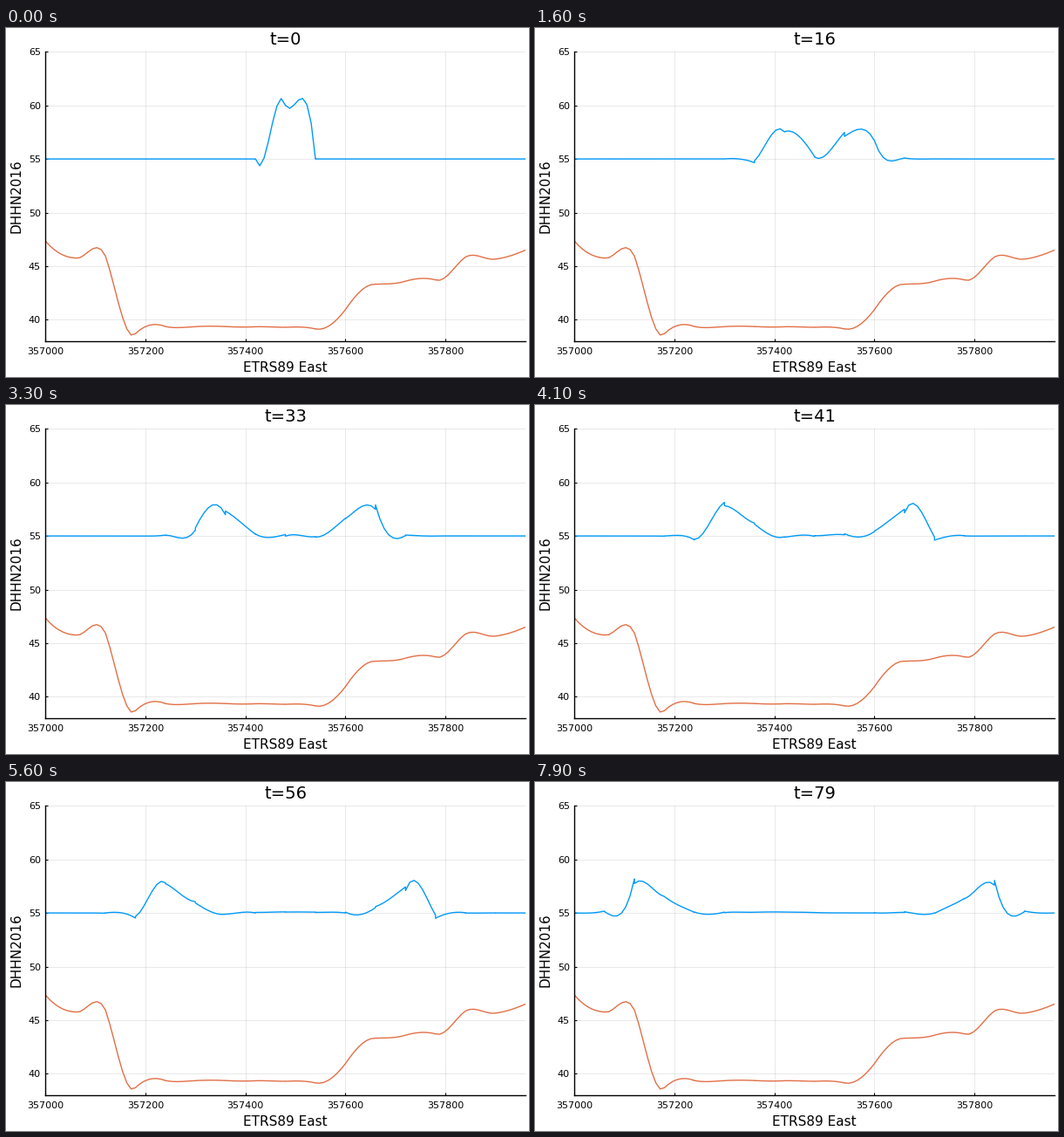
A matplotlib script for the animation above (8 s loop, 600 by 400 pixels).

```python
"""Shallow water wave over a river bed, solved with a nodal DG scheme."""
import numpy as np
import matplotlib.pyplot as plt
from matplotlib.animation import FuncAnimation

W, H, DPI = 600, 400, 100
LEFT, RIGHT, TOP, BOTTOM = 45.2, 596, 27.2, 359
X0, LENGTH, CELLS = 357000, 960, 16
Y_MIN, Y_MAX = 38, 65
FRAMES, SUBSTEPS = 80, 10
GRAVITY = 1.0
BLUE, ORANGE = "#009AFA", "#E26F46"

# River bed heights, one every 20 m
BED = np.array([
    47.35, 46.45, 45.95, 45.76, 46.1, 46.7, 45.95, 42.6, 39.4, 38.7,
    39.4, 39.58, 39.37, 39.27, 39.3, 39.36, 39.4, 39.4, 39.37, 39.33,
    39.32, 39.35, 39.35, 39.32, 39.3, 39.33, 39.3, 39.15, 39.25, 39.9,
    40.95, 42.2, 43.05, 43.32, 43.34, 43.4, 43.6, 43.81, 43.87, 43.72,
    43.95, 44.93, 45.86, 46.0, 45.75, 45.66, 45.84, 46.13, 46.5])


def spline(values, step, x):
    """Natural cubic spline through evenly spaced values."""
    n = len(values)
    a = np.eye(n)
    rhs = np.zeros(n)
    for i in range(1, n - 1):
        a[i, i - 1:i + 2] = 1, 4, 1
        rhs[i] = 6 * (values[i - 1] - 2 * values[i] + values[i + 1])
    m = np.linalg.solve(a, rhs)
    i = np.clip((x / step).astype(int), 0, n - 2)
    t = x / step - i
    s = 1 - t
    return (s * values[i] + t * values[i + 1]
            + ((s**3 - s) * m[i] + (t**3 - t) * m[i + 1]) / 6)


# Cubic Gauss-Lobatto element
r = np.array([-1, -np.sqrt(0.2), np.sqrt(0.2), 1])
END_WEIGHT = 1 / 6
powers = np.arange(4)
inv_vander = np.linalg.inv(r[:, None] ** powers)
diff = (powers * r[:, None] ** np.maximum(powers - 1, 0)) @ inv_vander
fine = np.linspace(-1, 1, 8)
to_fine = (fine[:, None] ** powers) @ inv_vander

size = LENGTH / CELLS
starts = size * np.arange(CELLS)[:, None]
nodes = starts + size * (r + 1) / 2
x_fine = (X0 + starts + size * (fine + 1) / 2).ravel()
bed = spline(BED, 20, nodes)


def flux(h, q):
    return np.array([q, q * q / h + GRAVITY * h * h / 2])


def rate(u):
    h, q = u
    v = q / h
    dq = q @ diff.T
    advect = ((q * v) @ diff.T + v * dq + q * (v @ diff.T)) / 2
    out = np.array([dq, advect + GRAVITY * h * ((h + bed) @ diff.T)])

    # Lax-Friedrichs flux between neighbouring cells
    f = flux(h, q)
    speed = np.abs(v) + np.sqrt(GRAVITY * h)
    lam = np.maximum(speed[:-1, -1], speed[1:, 0])
    star = ((f[:, :-1, -1] + f[:, 1:, 0])
            - lam * (u[:, 1:, 0] - u[:, :-1, -1])) / 2
    out[:, :-1, -1] += (star - f[:, :-1, -1]) / END_WEIGHT
    out[:, 1:, 0] -= (star - f[:, 1:, 0]) / END_WEIGHT
    return -2 / size * out


def step(u, dt):
    k1 = rate(u)
    k2 = rate(u + dt / 2 * k1)
    k3 = rate(u + dt / 2 * k2)
    k4 = rate(u + dt * k3)
    return u + dt / 6 * (k1 + 2 * k2 + 2 * k3 + k4)


def solve():
    surface = np.where(np.abs(nodes - 490) < 49.99, 60.0, 55.0)
    u = np.array([surface - bed, np.zeros_like(bed)])
    levels = []
    for _ in range(FRAMES):
        levels.append(((u[0] + bed) @ to_fine.T).ravel())
        for _ in range(SUBSTEPS):
            u = step(u, 1 / SUBSTEPS)
    return levels


levels = solve()

plt.rcParams["font.family"] = "DejaVu Sans"
fig = plt.figure(figsize=(W / DPI, H / DPI), dpi=DPI, facecolor="white")
ax = fig.add_axes([LEFT / W, 1 - BOTTOM / H,
                   (RIGHT - LEFT) / W, (BOTTOM - TOP) / H])
ax.set(xlim=(X0, X0 + LENGTH), ylim=(Y_MIN, Y_MAX))
x_ticks = range(X0, X0 + LENGTH, 200)
y_ticks = range(40, Y_MAX + 1, 5)
ax.set_xticks(x_ticks)
ax.set_yticks(y_ticks)
ax.tick_params(direction="in", length=2.5, width=0.8,
               labelbottom=False, labelleft=False)
ax.grid(color="black", alpha=0.1, linewidth=0.6)
ax.set_axisbelow(True)
for side in ("top", "right"):
    ax.spines[side].set_visible(False)
for side in ("left", "bottom"):
    ax.spines[side].set_linewidth(1)


def text(x, y, s, pt, ha="center", **kw):
    return fig.text(x / W, 1 - y / H, s, fontsize=pt, ha=ha,
                    va="baseline", **kw)


for x in x_ticks:
    text(LEFT + (x - X0) / LENGTH * (RIGHT - LEFT), 374, str(x), 8)
for y in y_ticks:
    py = BOTTOM - (y - Y_MIN) / (Y_MAX - Y_MIN) * (BOTTOM - TOP)
    text(40, py + 4, str(y), 8, ha="right")
middle = (LEFT + RIGHT) / 2
text(middle, 393.5, "ETRS89 East", 11)
text(16, (TOP + BOTTOM) / 2, "DHHN2016", 11,
     rotation=90, rotation_mode="anchor")
title = text(middle, 19.3, "t=0", 14)

water, = ax.plot(x_fine, levels[0], color=BLUE, linewidth=1)
ax.plot(x_fine, (bed @ to_fine.T).ravel(), color=ORANGE, linewidth=1)


def update(t):
    water.set_ydata(levels[t])
    title.set_text(f"t={t}")
    return water, title


anim = FuncAnimation(fig, update, frames=FRAMES, interval=100,
                     repeat=True, repeat_delay=0)
plt.show()
```
